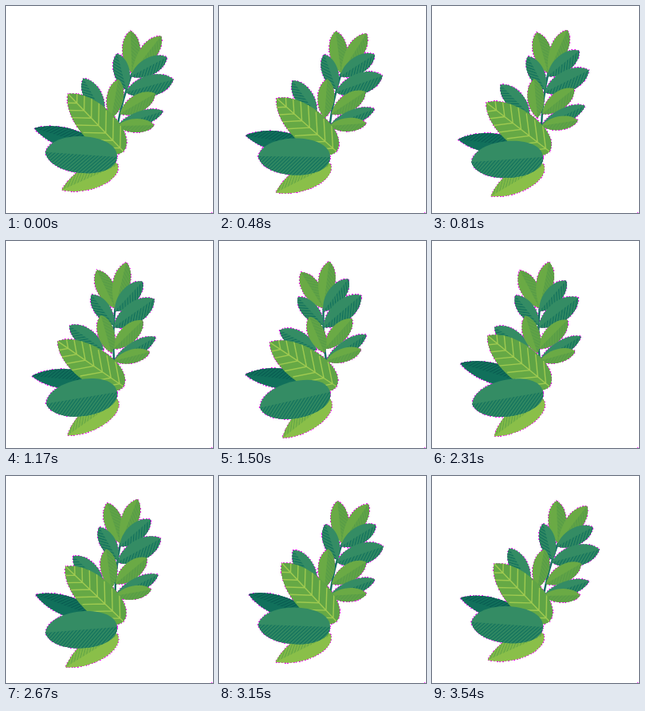
These frames come from a looping animation (259 by 259 pixels, 3.57 s). An HTML page:

```html
<!DOCTYPE html>
<html lang="en">
<head>
<meta charset="utf-8">
<title>Swaying leaves</title>
<style>
html, body { margin: 0; width: 100%; height: 100%; overflow: hidden; background: #fff; }
svg { display: block; width: 100vw; height: 100vh; }
</style>
</head>
<body>
<svg viewBox="0 0 259 259">
  <defs></defs>
  <g id="rim" fill="none" stroke="#f01ef0" stroke-width="1.5" stroke-dasharray="2 1.6" shape-rendering="crispEdges"></g>
  <g id="plant"></g>
  <rect x="257" y="258" width="1" height="1" fill="#f0f"/>
</svg>
<script>
const LOOP = 3570, STEP = 30, ROOT_Y = 152;
const rim = document.getElementById('rim');
const plant = document.getElementById('plant');
const defs = document.querySelector('defs');

function add(parent, tag, attrs = {}) {
  const el = document.createElementNS('http://www.w3.org/2000/svg', tag);
  for (const key in attrs) el.setAttribute(key, attrs[key]);
  parent.appendChild(el);
  return el;
}

const kinds = {
  dark:  { fill: '#348c64', half: '#318962', line: '#0f6f5c' },
  deep:  { fill: '#11705b', half: '#11705b', line: '#075a50' },
  light: { fill: '#6aaa45', half: '#60a346', line: '#569b46' },
  lime:  { fill: '#8abf49', half: '#82ba48', line: '#61a546' },
  vein:  { fill: '#5fa445', half: '#66a945', line: '#9fca50' }
};

for (const name in kinds) {
  const p = add(defs, 'pattern', {
    id: name, width: 3.2, height: 3.2, patternUnits: 'userSpaceOnUse', patternTransform: 'rotate(45)'
  });
  add(p, 'rect', { width: 1.1, height: 3.2, fill: kinds[name].line });
}

// 0 at rest, 1 fully swayed; peak is the phase of the far end in degrees
function swing(t, peak = 180) {
  return (1 + Math.cos(2 * Math.PI * t / LOOP - peak * Math.PI / 180)) / 2;
}

// Point on the bending stem at height h
function stemAt(h, k) {
  return [139 + .18 * h + .0014 * h * h - k * (5 + .35 * h), ROOT_Y - h];
}

// Angles are clockwise from straight up; turn is how far a leaf leans left
function makeLeaf(kind, base, angle, turn, len, { w = len * .21, side = 1, a = .26, b = .82, peak } = {}) {
  return { kind, base, angle, turn, len, w, side, a, b, peak };
}

const onStem = (kind, h, angle, turn, len, opts) =>
  makeLeaf(kind, k => stemAt(h, k), angle, turn, len, opts);

const fixed = (kind, x, y, angle, turn, len, opts) =>
  makeLeaf(kind, () => [x, y], angle, turn, len, opts);

const leaves = [
  onStem('light', 68, -2, 32, 53),
  onStem('light', 68, 38, 33, 59, { w: 10.5, a: .4 }),
  onStem('dark', 64, 62, 26, 51),
  onStem('dark', 47, -14, 30, 47, { side: -1 }),
  onStem('dark', 44, 75, 27, 62),
  onStem('light', 17, 60, 19, 51),
  onStem('dark', 2, 72, 16, 60, { w: 9 }),
  onStem('light', 2, 89, 18, 46, { w: 8.5 }),
  fixed('dark', 122, 136, -29, 35, 52, { side: -1 }),
  fixed('light', 132, 140, 10, 35, 49),
  fixed('deep', 112, 176, -69, 16, 80, { w: 12.5, a: .1, b: .7, peak: 117 }),
  fixed('vein', 147, 182, -43, 13.5, 100, { w: 22, side: -1, a: .03, b: .8, peak: 150 }),
  fixed('lime', 140, 199, -114, 15, 77, { w: 15, a: .05, b: .65 }),
  fixed('dark', 139, 189, -86, 17.5, 90, { w: 23, side: -1, a: 0, b: .92, peak: 177 })
];

function veins(len) {
  let d = `M0 0H${len}`;
  for (let x = 6; x < len - 8; x += 13) d += `M${x + 20} -20L${x} 0L${x + 20} 20`;
  return d;
}

function build(leaf) {
  const { kind, len, w, side, a, b } = leaf;
  const { fill, half, line } = kinds[kind];
  const h = w * 4 / 3;
  const edge = s => `M0 0C${a * len} ${s * h} ${b * len} ${s * h} ${len} 0`;
  const outline = edge(1) + `C${b * len} ${-h} ${a * len} ${-h} 0 0Z`;
  const sidePath = edge(side) + 'Z';

  leaf.rim = add(rim, 'path', { d: outline });
  leaf.body = add(plant, 'g');
  add(leaf.body, 'path', { d: outline, fill });
  add(leaf.body, 'path', { d: sidePath, fill: half });
  if (kind === 'vein') {
    add(add(defs, 'clipPath', { id: 'veinClip' }), 'path', { d: outline });
    add(leaf.body, 'path', {
      d: veins(len), fill: 'none', stroke: line, 'stroke-width': 1.4, 'clip-path': 'url(#veinClip)'
    });
  } else {
    add(leaf.body, 'path', { d: sidePath, fill: `url(#${kind})` });
  }
}

const stemRim = add(rim, 'path');
const stem = add(plant, 'path', { fill: 'none', stroke: '#126e63', 'stroke-width': 2.4, 'stroke-linecap': 'round' });
leaves.forEach(build);

function draw(t) {
  for (const { base, angle, turn, peak, rim, body } of leaves) {
    const k = swing(t, peak);
    const move = `translate(${base(k)}) rotate(${angle - turn * k - 90})`;
    rim.setAttribute('transform', move);
    body.setAttribute('transform', move);
  }
  const k = swing(t);
  const points = [0, 17, 34, 51, 68].map(h => stemAt(h, k));
  const d = 'M' + points.join('L');
  stem.setAttribute('d', d);
  stemRim.setAttribute('d', d);
}

const start = performance.now();
function tick() {
  const t = (performance.now() - start) % LOOP;
  draw(Math.floor(t / STEP) * STEP);
  requestAnimationFrame(tick);
}
draw(0);
requestAnimationFrame(tick);
</script>
</body>
</html>
```
